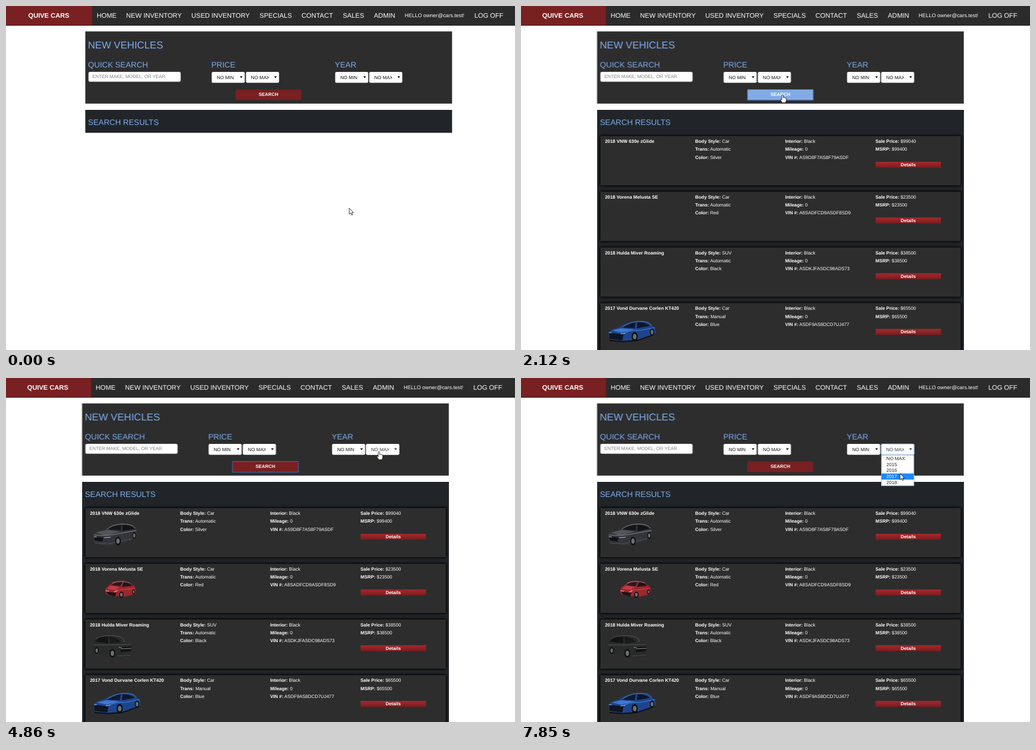
Animation, 909 px wide and 616 px high, one loop 8000 ms. Source, as an HTML page:

```html
<!DOCTYPE html>
<html lang="en">
<head>
<meta charset="utf-8">
<title>New vehicles</title>
<style>
html, body { margin: 0; width: 100%; height: 100%; overflow: hidden; background: #fff; }
svg { display: block; font: 8.3px "Liberation Sans", Arial, sans-serif; text-rendering: geometricPrecision; }
text { white-space: pre; }
.b { font-weight: bold; }
.w { fill: #fff; }
.nav { font-size: 11.8px; fill: #fff; }
.h2 { font-size: 17.8px; fill: #7fadee; }
.h3 { font-size: 14.05px; fill: #7fadee; }
.sel { font-size: 8.45px; }
.mid { text-anchor: middle; }
.row { fill: #2d2d2d; filter: drop-shadow(0 0 2px #000) drop-shadow(0 0 1px #000); }

/* the page narrows when the result list makes it scroll */
#nav { animation: nav 8s step-end infinite; }
#page { animation: page 8s step-end infinite; }
@keyframes nav { 26.5%, 100% { transform: translateX(-1.9px); } }
@keyframes page { 26.5%, 100% { transform: translateX(-5.6px); } }

#pointer { animation: move 8s linear infinite; }
#pointer path { fill: #fff; stroke: #000; stroke-width: .8; stroke-linejoin: round; }
@keyframes move {
  0% { transform: translate(613px, 362px); }
  3.9% { transform: translate(613px, 362px); animation-timing-function: cubic-bezier(.4, 0, .7, .9); }
  13.625% { transform: translate(485px, 177px); animation-timing-function: ease-out; }
  16.75% { transform: translate(467px, 159px); animation-timing-function: step-end; }
  50.375% { transform: translate(468px, 158px); animation-timing-function: step-end; }
  52% { transform: translate(468px, 158px); animation-timing-function: cubic-bezier(.4, 0, .5, 1); }
  60.75% { transform: translate(666px, 132px); animation-timing-function: step-end; }
  88.1% { transform: translate(666px, 132px); animation-timing-function: ease-in-out; }
  94.875% { transform: translate(677px, 169px); animation-timing-function: step-end; }
  97.5% { transform: translate(677px, 170px); animation-timing-function: step-end; }
  98.125%, 100% { transform: translate(677px, 171px); }
}
</style>
</head>
<body>
<svg id="stage" width="909" height="616" viewBox="0 0 909 616"></svg>
<script>
const LOOP = 8000;

const rect = (x, y, w, h, fill, more = '') =>
  `<rect x="${x}" y="${y}" width="${w}" height="${h}" fill="${fill}" ${more}/>`;
const text = (x, y, str, cls = '', more = '') =>
  `<text x="${x}" y="${y}" class="${cls}" ${more}>${str}</text>`;
const path = (d, fill) => `<path d="${d}" fill="${fill}"/>`;
const line = (d, color, w = 1) => `<path d="${d}" fill="none" stroke="${color}" stroke-width="${w}"/>`;
const wheel = (x, y, rx, ry) =>
  `<ellipse cx="${x}" cy="${y}" rx="${rx}" ry="${ry}" fill="#0d0d0f"/>` +
  `<ellipse cx="${x}" cy="${y}" rx="${rx * .6}" ry="${ry * .62}" fill="#6d6e73"/>`;
// times alternate: appear, vanish, appear, ...
const during = (times, body) => `<g data-on="${times}">${body}</g>`;

function select(x, label, color = '#111') {
  return rect(x, 118, 59, 19.5, '#fff', 'rx="2.5"') +
    `<svg x="${x}" y="118" width="40.6" height="20">${text(9, 12.5, label, 'sel', `fill="${color}"`)}</svg>` +
    path(`M${x + 50.4} 125.8h4.6l-2.3 3.8z`, color);
}

function navBar() {
  const items = [[162, 'HOME'], [214.6, 'NEW INVENTORY'], [331, 'USED INVENTORY'], [452.8, 'SPECIALS'],
    [527.8, 'CONTACT'], [601.5, 'SALES'], [657, 'ADMIN'], [836.4, 'LOG OFF']];
  return rect(0, 0, 909, 35, '#2b2b2b') +
    '<g id="nav">' + rect(-5, 0, 158.9, 34.6, '#782022') +
    text(76.5, 21, 'QUIVE CARS', 'nav b mid') +
    items.map(([x, s]) => text(x, 21, s, 'nav')).join('') +
    text(712, 20.2, 'HELLO owner@cars.test!', 'w', 'style="font-size:9.4px"') +
    '</g>' + rect(0, 34.4, 909, .8, '#121212');
}

function searchPanel() {
  return rect(141.6, 45.5, 655, 129.3, '#2d2d2d') +
    text(146.2, 75.6, 'NEW VEHICLES', 'h2') +
    text(146.6, 109.5, 'QUICK SEARCH', 'h3') +
    text(366.7, 109.5, 'PRICE', 'h3') +
    text(587.3, 109.5, 'YEAR', 'h3') +
    rect(147.4, 118, 164.5, 17.6, '#fff', 'rx="2.5" stroke="#bbb" stroke-width=".4"') +
    text(154.4, 129.4, 'ENTER MAKE, MODEL, OR YEAR', '', 'fill="#808080"') +
    select(367.4, 'NO MIN') + select(428.6, 'NO MAX') +
    select(587.9, 'NO MIN') + select(648.7, 'NO MAX') +
    during('4700', select(648.7, 'NO MAX', '#363b42')) +
    during('6560', rect(649, 117.9, 58.6, 19.8, 'none', 'rx="2" stroke="#5b9be0" stroke-width=".9"')) +
    rect(410, 149.8, 117.4, 18.8, '#782022', 'rx="1.5"') +
    during('1190 4440', rect(410, 149.8, 117.4, 18.8, '#82abe5', 'rx="1.5"')) +
    during('1820 2020', rect(411, 150, 115, 2, '#000', 'opacity=".13"')) +
    during('2020 6510', rect(410.1, 149.5, 117.5, 19.2, 'none', 'stroke="#456fc4"')) +
    text(468.7, 161, 'SEARCH', 'b w mid');
}

const cars = {
  sedan: path('M155 281C157 276 168 272 178 271C188 264 196 261 208 261C222 261 229 264 232 271C235 276 234 283 232 286L204 297C190 301 165 299 157 294Z', '#34353a') +
    path('M181 271C190 265 198 263 206 263L205 273Z', '#15161a') +
    path('M208 263C220 263 226 266 230 270L208 274Z', '#121317') +
    path('M160 277L180 272L204 275L178 282Z', '#54555b') +
    line('M180 271Q190 262 208 261.5T231 269', '#85868c') +
    line('M157 281Q178 284 205 278L233 273', '#8b8c92') +
    line('M159 296L182 297L225 288', '#5b5c62', .8) +
    path('M157 284L174 286L172 293L159 291Z', '#101115') +
    line('M157 284L162 285M175 286L187 285', '#c5c6cc', 1.2) +
    wheel(200, 292, 5, 7.5) + wheel(229, 282, 3.4, 6),
  compact: path('M177 379C179 374 186 370 191 366C200 362 214 362 221 367C228 371 232 374 232 380L231 387L211 392L182 389C178 387 177 383 177 379Z', '#9d262d') +
    path('M188 371C194 366 201 364 209 364L204 373Z', '#241b1f') +
    path('M211 364C218 365 222 369 226 372L207 374Z', '#191519') +
    path('M180 377L188 372L203 374L195 380Z', '#c63a41') +
    line('M190 367Q205 362 221 367', '#d3878a', .8) +
    line('M196 380L230 377', '#d04a50') +
    path('M179 382L197 385L195 391L182 388Z', '#1d1417') +
    line('M178 381L184 382M193 383L199 381', '#d9cfd0', 1.2) +
    wheel(206, 388, 4, 5.5) + wheel(228, 383, 2.6, 4.5),
  suv: path('M154 478C155 471 159 464 165 462L190 461C201 463 207 469 211 473L224 476C226 483 226 494 223 498L196 501L158 492C154 490 154 484 154 478Z', '#292a2a') +
    path('M158 472L167 464L183 463L182 475Z', '#121313') +
    path('M185 463C195 464 201 468 206 473L186 475Z', '#181919') +
    line('M160 467Q168 461 190 461.5T211 473', '#626363', .8) +
    line('M156 478L186 478L223 477', '#555656') +
    path('M204 482L224 481L223 489L205 491Z', '#111213') +
    line('M201 482L207 483M205 485L224 484', '#a3a3a3', .9) +
    line('M199 498L223 496', '#4c4d4d') +
    wheel(190, 493, 5, 7.5) + wheel(162, 488, 3.5, 6),
  coupe: path('M156 588C157 582 162 579 174 576C187 568 198 564 212 564C225 565 230 568 235 573C240 576 241 581 240 586L207 598L180 600L158 597Z', '#1e458c') +
    path('M181 576C190 570 198 567 205 566L203 577Z', '#111a2c') +
    path('M208 566C222 567 226 569 230 573L207 577Z', '#0e1728') +
    path('M162 581L179 577L202 579L180 585Z', '#3d78d2') +
    line('M182 574Q197 564.5 213 564.5T233 572', '#4a80d0') +
    line('M184 586Q197 579 212 581L239 576', '#4780d8', 1.2) +
    path('M157 585L183 588L181 599L158 596Z', '#0f1524') +
    line('M157 585L162 585M178 587L186 586', '#b4c8e8', 1.2) +
    line('M158 599L181 601L207 599L234 590', '#0b0d12', 1.8) +
    wheel(203, 592, 5.5, 8) + wheel(234, 584, 4, 6.5)
};

function vehicle(i, name, style, trans, color, miles, vin, sale, msrp) {
  const top = 232.8 + i * 99.75;
  const pair = (x, n, key, val) =>
    text(x, top + 12.3 + n * 14.3, `<tspan class="b">${key}:</tspan> ${val}`, 'w');
  return rect(141.6, top, 643.8, 88.3, '#2d2d2d', 'class="row"') +
    text(150, top + 12.3, name, 'b w') +
    pair(311, 0, 'Body Style', style) + pair(311, 1, 'Trans', trans) + pair(311, 2, 'Color', color) +
    pair(471.7, 0, 'Interior', 'Black') + pair(471.7, 1, 'Mileage', miles) + pair(471.7, 2, 'VIN #', vin) +
    pair(633, 0, 'Sale Price', '$' + sale) + pair(633, 1, 'MSRP', '$' + msrp) +
    rect(633.4, top + 46.2, 116.6, 10.6, 'url(#red)') +
    text(691.5, top + 54.4, 'Details', 'b w mid');
}

function results() {
  return rect(136, 186, 655, 430, '#212529') +
    text(141, 212.9, 'SEARCH RESULTS', 'h3') +
    vehicle(0, '2018 VNW 630e zGlide', 'Car', 'Automatic', 'Silver', 0, 'AS9D8F7AS8F79ASDF', 99040, 99400) +
    vehicle(1, '2018 Vorena Melusta SE', 'Car', 'Automatic', 'Red', 0, 'A8SADFCD9ASDF8SD9', 23500, 23500) +
    vehicle(2, '2018 Hulda Miver Roaming', 'SUV', 'Automatic', 'Black', 0, 'ASDKJFASDC98ADS73', 38500, 38500) +
    vehicle(3, '2017 Vond Durvane Corlen KT420', 'Car', 'Manual', 'Blue', 0, 'ASDF9AS8DCD7UJ477', 65500, 65500) +
    cars.coupe + during('2320', cars.sedan + cars.compact + cars.suv);
}

function yearMenu() {
  const lit = ['6510 7320', '7320 7430', '7430 7850', '7850'];
  const option = (s, i, cls) => text(652.6, 146.9 + i * 10.75, s, 'sel ' + cls, 'fill="#222"');
  const years = ['NO MAX', 2015, 2016, 2017, 2018];
  return rect(643.6, 138, 58.2, 55, '#fff', 'stroke="#8ba3bd" stroke-width=".8"') +
    years.map((s, i) => option(s, i, '')).join('') +
    lit.map((t, i) => during(t, rect(644, 138.6 + i * 10.8, 57.4, 10.9, '#1d88fd') + option(years[i], i, 'w'))).join('');
}

document.getElementById('stage').innerHTML =
  '<defs><linearGradient id="red" x2="0" y2="1"><stop stop-color="#a32a2e"/><stop offset="1" stop-color="#7a1c1f"/></linearGradient></defs>' +
  navBar() + '<g id="page">' + searchPanel() + '</g>' +
  during('0 2120', rect(141.6, 186, 655, 41, '#212529') + text(146.6, 212.9, 'SEARCH RESULTS', 'h3')) +
  during('2120', results()) +
  during('6510', yearMenu()) +
  '<g id="pointer">' +
  during('0 1190 4440 4700 7130', '<path d="M0 0V11L2.6 8.7L4.3 12.5L6 11.8L4.4 8.1H7.7Z"/>') +
  during('1190 4440 4700 7130', '<path d="M-1.2 9V1.2C-1.2-.4 1.2-.4 1.2 1.2V5C1.6 4.3 3 4.5 3.1 5.3C3.6 4.8 4.9 5 5 6C5.6 5.5 6.8 5.8 6.8 7V10C6.8 11.5 5.8 12.3 5.6 14.2H-.6C-.9 12.6-3 10.6-3.6 8.8C-4 7.6-2.4 7.2-1.2 9Z"/>') +
  '</g>';

// turn each list of times into stepped opacity keyframes
const sheet = document.createElement('style');
document.querySelectorAll('[data-on]').forEach((el, n) => {
  const stops = el.dataset.on.split(' ').map((t, i) => `${t / LOOP * 100}%{opacity:${1 - i % 2}}`);
  const last = stops.length % 2;
  sheet.textContent += `@keyframes on${n}{0%{opacity:0}${stops.join('')}100%{opacity:${last}}}`;
  el.style.animation = `on${n} ${LOOP}ms step-end infinite`;
});
document.head.append(sheet);
</script>
</body>
</html>
```
